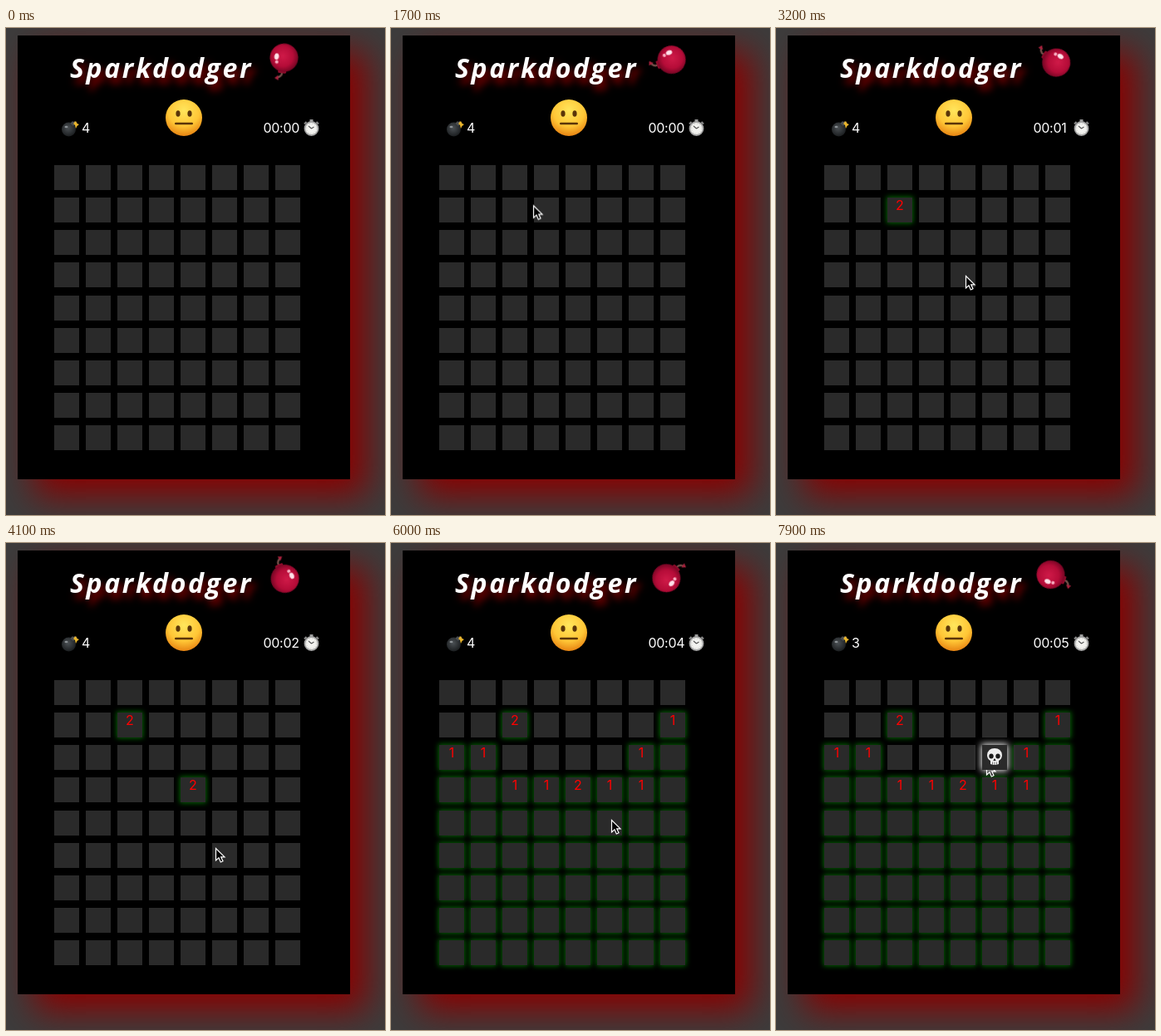
Animation, 456 px wide and 586 px high, one loop 8000 ms. Source, as an HTML page:

```html
<!DOCTYPE html>
<html lang="en">
<head>
<meta charset="utf-8">
<title>Sparkdodger</title>
<style>
  html, body { margin: 0; width: 100%; height: 100%; overflow: hidden; background: #3c3c3c; }
  #stage { position: relative; width: 456px; height: 586px; overflow: hidden; }
  #card {
    position: absolute; left: 14px; top: 9px; width: 400px; height: 534px;
    background: #000; box-shadow: 20px 20px 40px #8b0000;
  }
  .art { position: absolute; left: 0; top: 0; }
  h1 {
    position: absolute; left: 77px; top: 26px; margin: 0; white-space: nowrap;
    font: italic 700 32px/44px "Open Sans", sans-serif; letter-spacing: 2.6px;
    color: #fff; text-shadow: 5px 7px 10px #8b0000;
  }
  .stat {
    position: absolute; top: 110px; color: #fff;
    font: 16px/20px Inter, sans-serif; letter-spacing: -.3px;
  }
  .cell {
    position: absolute; width: 30px; height: 30px; background: #2a2a2a;
    color: transparent; text-align: center;
    font: 16px/19px Inter, sans-serif;
  }
  .cell.open { color: #f00; box-shadow: 0 0 6px 1px #006400; }
  .cell.skull { box-shadow: 0 0 8px 1px #fff; z-index: 1; }
  .cell svg { display: none; }
  .cell.skull svg { display: block; }
  #bomb { animation: spin 8s linear infinite; }
  #cursor { animation: roam 8s ease-in-out infinite; }
  @keyframes spin {
    from { transform: translate(334px, 39.5px) rotate(98deg); }
    to { transform: translate(334px, 39.5px) rotate(386deg); }
  }
  @keyframes roam {
    0%, 5% { transform: translate(470px, 140px); }
    11.25% { transform: translate(277px, 188px); }
    24%, 30% { transform: translate(160px, 216px); }
    39%, 43% { transform: translate(228px, 298px); }
    51.25% { transform: translate(252px, 367px); }
    66.25% { transform: translate(261px, 387px); }
    70% { transform: translate(262px, 380px); }
    75% { transform: translate(265px, 333px); }
    86%, 100% { transform: translate(253px, 264px); }
  }
</style>
</head>
<body>
<div id="stage">
  <div id="card"></div>
  <h1>Sparkdodger</h1>
  <div class="stat" style="left:91px" id="mines">4</div>
  <div class="stat" style="left:309.5px" id="clock">00:00</div>
  <div id="grid"></div>

  <svg class="art" width="456" height="586" viewBox="0 0 456 586">
    <defs>
      <radialGradient id="red" cx=".45" cy=".55" r=".6">
        <stop offset="0" stop-color="#cf1a48"/><stop offset=".6" stop-color="#b50c38"/><stop offset="1" stop-color="#6a0420"/>
      </radialGradient>
      <radialGradient id="dark" cx=".45" cy=".4" r=".6">
        <stop offset="0" stop-color="#4b5054"/><stop offset="1" stop-color="#1b1e20"/>
      </radialGradient>
      <radialGradient id="gold" cx=".5" cy=".3" r=".72">
        <stop offset="0" stop-color="#ffe65c"/><stop offset=".6" stop-color="#ffc636"/><stop offset="1" stop-color="#e57f10"/>
      </radialGradient>
    </defs>

    <g id="bomb">
      <path d="M13 0Q19 -1 21 5" fill="none" stroke="#75504a" stroke-width="2.4"/>
      <path d="M18 4L24 3L22 8Z" fill="#a8203c"/>
      <rect x="10" y="-5" width="5" height="10" rx="1.5" fill="#8d0a2a"/>
      <circle cx="-3.8" r="17" fill="url(#red)"/>
      <ellipse cx="-4" cy="9" rx="3.8" ry="2.8" fill="#ffe2ea"/>
      <circle cx="2.5" cy="8" r="2" fill="#f8b0c2"/>
    </g>

    <g transform="translate(76 121)">
      <path d="M4 -5Q6 -10 9 -6" fill="none" stroke="#9a8a68" stroke-width="1.5"/>
      <circle r="8.5" cx="-.5" cy="1" fill="url(#dark)"/>
      <rect x="2" y="-8" width="5" height="4" rx="1" transform="rotate(40 4.5 -6)" fill="#4a4d50"/>
      <path d="M8 -9L9.5 -6L12 -5L9.5 -3L8 0L7 -4L5 -6Z" fill="#e9b52c"/>
      <ellipse cx="-3.5" cy="-2" rx="2" ry="1.3" fill="#8a9094"/>
    </g>

    <g transform="translate(214 108)">
      <circle r="22" fill="url(#gold)"/>
      <g fill="#5a3509">
        <ellipse cx="-7" cy="-5" rx="2.6" ry="3.8"/>
        <ellipse cx="7" cy="-5" rx="2.6" ry="3.8"/>
        <rect x="-11" y="5.7" width="22" height="2.6" rx="1.3"/>
      </g>
    </g>

    <g transform="translate(367.5 121)">
      <rect x="-2" y="-11" width="4" height="4" fill="#9b9b9b"/>
      <path d="M6 -8L8.5 -5.5M-6 -8L-8.5 -5.5" stroke="#8b8b8b" stroke-width="2"/>
      <circle r="8" fill="#f3f3f0" stroke="#a5a5a5" stroke-width="1.8"/>
      <path d="M0 0L-3.5 -3M0 0L3 -2" stroke="#555" stroke-width="1.1"/>
      <circle r="5.8" fill="none" stroke="#c5c5c0" stroke-dasharray="1 2"/>
    </g>

    <path id="cursor" d="M.5 .5V15L4 11.8L6.3 17L9 15.8L6.7 10.8H11Z" fill="#000" stroke="#fff" stroke-width="1.2"/>
  </svg>
</div>

<script>
  const LOOP = 8000, COLS = 8, ROWS = 9;
  const FIRST = 1950, SECOND = 3300, FLOOD = 5600, MINE = 7000;
  const numbers = { "2,1": 2, "7,1": 1, "0,2": 1, "1,2": 1, "6,2": 1,
                    "2,3": 1, "3,3": 1, "4,3": 2, "5,3": 1, "6,3": 1 };
  const skull = `<svg width="30" height="30" viewBox="-15 -14 30 30">
    <path d="M-5 9V5Q-9 3 -9 -2Q-8 -10 0 -10Q8 -10 9 -2Q9 3 5 5V9Q0 11 -5 9Z" fill="#eee"/>
    <g fill="#1b1b1b"><ellipse cx="-4" cy="-.5" rx="2.7" ry="2.9"/><ellipse cx="4" cy="-.5" rx="2.7" ry="2.9"/>
    <path d="M0 2L1.7 5H-1.7Z"/></g>
    <path d="M-2.5 6.5V10M0 6.5V10M2.5 6.5V10" stroke="#777"/></svg>`;

  const get = id => document.getElementById(id);

  function openTime(col, row) {
    if (col === 2 && row === 1) return FIRST;
    if (col === 4 && row === 3) return SECOND;
    if (col === 5 && row === 2) return MINE;
    const flooded = row > 2 || (row === 2 && (col < 2 || col > 5)) || (row === 1 && col === 7);
    return flooded ? FLOOD : Infinity;
  }

  const cells = [];
  for (let row = 0; row < ROWS; row++) {
    for (let col = 0; col < COLS; col++) {
      const el = document.createElement("div");
      const at = openTime(col, row);
      el.className = "cell";
      el.style.left = 58 + col * 38 + "px";
      el.style.top = Math.round(165 + row * 39.15) + "px";
      if (at === MINE) el.innerHTML = skull;
      else el.textContent = numbers[col + "," + row] || "";
      get("grid").append(el);
      cells.push({ el, at, look: at === MINE ? "skull" : "open" });
    }
  }

  const spin = get("bomb").getAnimations()[0];

  function draw() {
    // Share the clock of the CSS animations so both stay in step.
    const t = (spin.currentTime || 0) % LOOP;
    for (const { el, at, look } of cells) el.classList.toggle(look, t >= at);
    get("mines").textContent = t >= MINE ? 3 : 4;
    get("clock").textContent = "00:0" + Math.max(0, Math.floor((t - FIRST) / 1000));
    requestAnimationFrame(draw);
  }
  draw();
</script>
</body>
</html>
```
